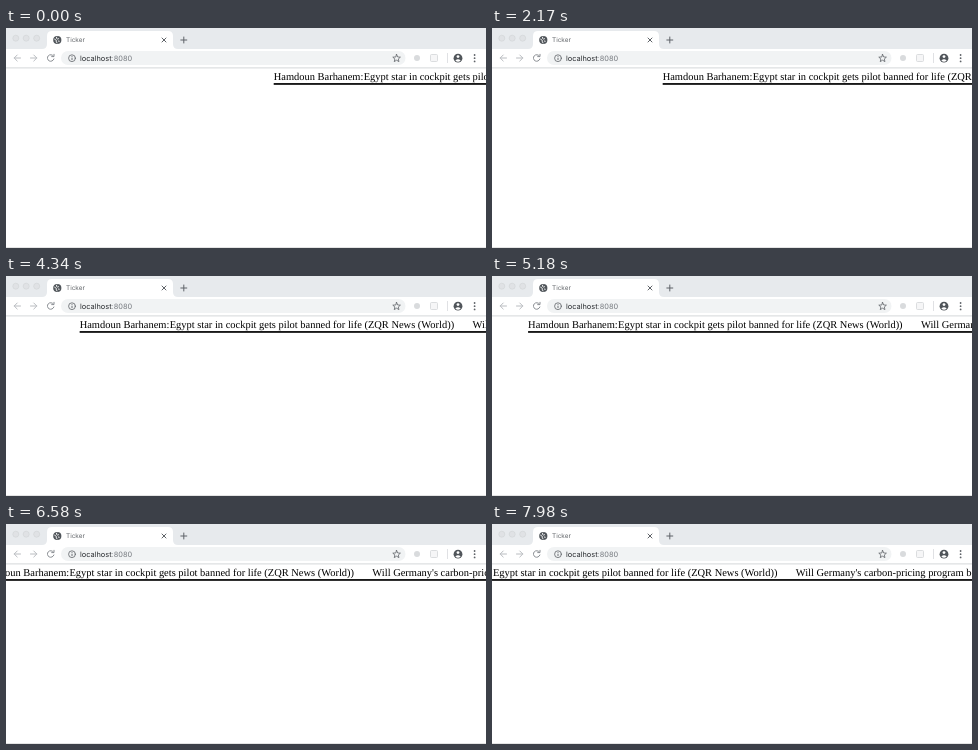
Animation, 480 px wide and 220 px high, one loop 8 s. Source, as an HTML page:

```html
<!DOCTYPE html>
<html lang="en">
<head>
<meta charset="utf-8">
<title>Ticker</title>
<style>
  html, body { margin: 0; width: 100%; height: 100%; overflow: hidden; background: #fff; }
  svg { display: block; width: 480px; height: 220px; }
  text { text-rendering: geometricPrecision; white-space: pre; }
  .ui { font-family: Inter, Roboto, sans-serif; }
  .news { font: 10.46px "Liberation Serif", "Times New Roman", serif; }
  .line { fill: none; stroke: #5f6368; stroke-width: 1; stroke-linecap: round; stroke-linejoin: round; }
  .faint { stroke: #b9bcc0; }
</style>
</head>
<body>
<svg viewBox="0 0 480 220">
  <rect width="480" height="220" fill="#fff"/>

  <!-- tab strip -->
  <rect width="480" height="21" fill="#e7eaed"/>
  <g fill="#e0e2e5" stroke="#d0d3d6" stroke-width=".6">
    <circle cx="9.8" cy="10.2" r="3"/>
    <circle cx="20.2" cy="10.2" r="3"/>
    <circle cx="30.7" cy="10.2" r="3"/>
  </g>
  <path d="M36 21q5 0 5-5V8q0-5 5-5H162q5 0 5 5v8q0 5 5 5z" fill="#fff"/>
  <circle cx="51.3" cy="12" r="4.1" fill="#50555a"/>
  <path d="M48.3 11l2 1.3v1.6l1 1.3M51 8.8l-.8 1.3 1.5 1 1.2-.6M52 13l1.6.3" fill="none" stroke="#fff" stroke-width=".9"/>
  <text class="ui" x="60" y="14.4" font-size="6.4" fill="#606468">Ticker</text>
  <path class="line" d="M156 10l4 4M160 10l-4 4M174.8 12h6M177.8 9v6"/>

  <!-- toolbar -->
  <path class="line faint" d="M14.5 30H8.2M11.2 27l-3 3 3 3M24.5 30h6.3M27.8 27l3 3-3 3"/>
  <path class="line" stroke-width="1" style="stroke:#8a8e93" d="M47.4 28a3.3 3.3 0 1 0 .5 3M48 26.3v2.3h-2.3"/>
  <rect x="55" y="23" width="344.5" height="14" rx="7" fill="#f1f3f4"/>
  <circle class="line" cx="66" cy="30.2" r="3.4" style="stroke-width:.8"/>
  <path class="line" style="stroke-width:.9;stroke-linecap:butt" d="M66 29.8v2.2M66 28.2v.9"/>
  <text class="ui" x="74" y="32.8" font-size="7.4" fill="#2b2e32">localhost<tspan fill="#777b80">:8080</tspan></text>
  <path id="star" class="line" style="stroke-width:.8"/>
  <circle cx="411" cy="30" r="3" fill="#d9dbdd"/>
  <rect x="424.5" y="26.5" width="7" height="7" rx="1" fill="#f6f6f7" stroke="#d4d6d9" stroke-width=".8"/>
  <path d="M441.5 25v10" stroke="#d8dadd" stroke-width=".8"/>
  <circle cx="452" cy="30.2" r="4.4" fill="#50555a"/>
  <circle cx="452" cy="28.6" r="1.4" fill="#fff"/>
  <path d="M449.3 32.4q2.7-2.2 5.4 0q-2.7 2.6-5.4 0z" fill="#fff"/>
  <g fill="#5f6368">
    <circle cx="468.6" cy="27" r=".9"/>
    <circle cx="468.6" cy="30.2" r=".9"/>
    <circle cx="468.6" cy="33.4" r=".9"/>
  </g>
  <rect y="39.4" width="480" height="1" fill="#d5d7da"/>
  <rect y="219" width="480" height="1" fill="#e4e4e4"/>

  <!-- headlines -->
  <g id="ticker">
    <text class="news" y="51.6">Hamdoun Barhanem:</text>
    <text class="news" x="90" y="51.6">Egypt star in cockpit gets pilot banned for life (ZQR News (World))</text>
    <text class="news" x="392.9" y="51.6">Will Germany's carbon-pricing program be enough?</text>
    <rect y="55.1" width="900" height="1.7"/>
  </g>
</svg>
<script>
  const LOOP = 8000, TICK = 70, START_X = 267.7, STEP_X = 3.13;
  const ticker = document.getElementById('ticker');

  const starPoints = Array.from({ length: 10 }, (_, i) => {
    const r = i % 2 ? 1.8 : 4, a = i * Math.PI / 5;
    return `${390.6 + r * Math.sin(a)} ${30.4 - r * Math.cos(a)}`;
  });
  document.getElementById('star').setAttribute('d', `M${starPoints.join('L')}z`);

  const origin = performance.now();
  function draw(now) {
    const tick = Math.floor(Math.max(0, now - origin) % LOOP / TICK);
    ticker.setAttribute('transform', `translate(${START_X - STEP_X * tick} 0)`);
    requestAnimationFrame(draw);
  }
  draw(origin);
</script>
</body>
</html>
```
